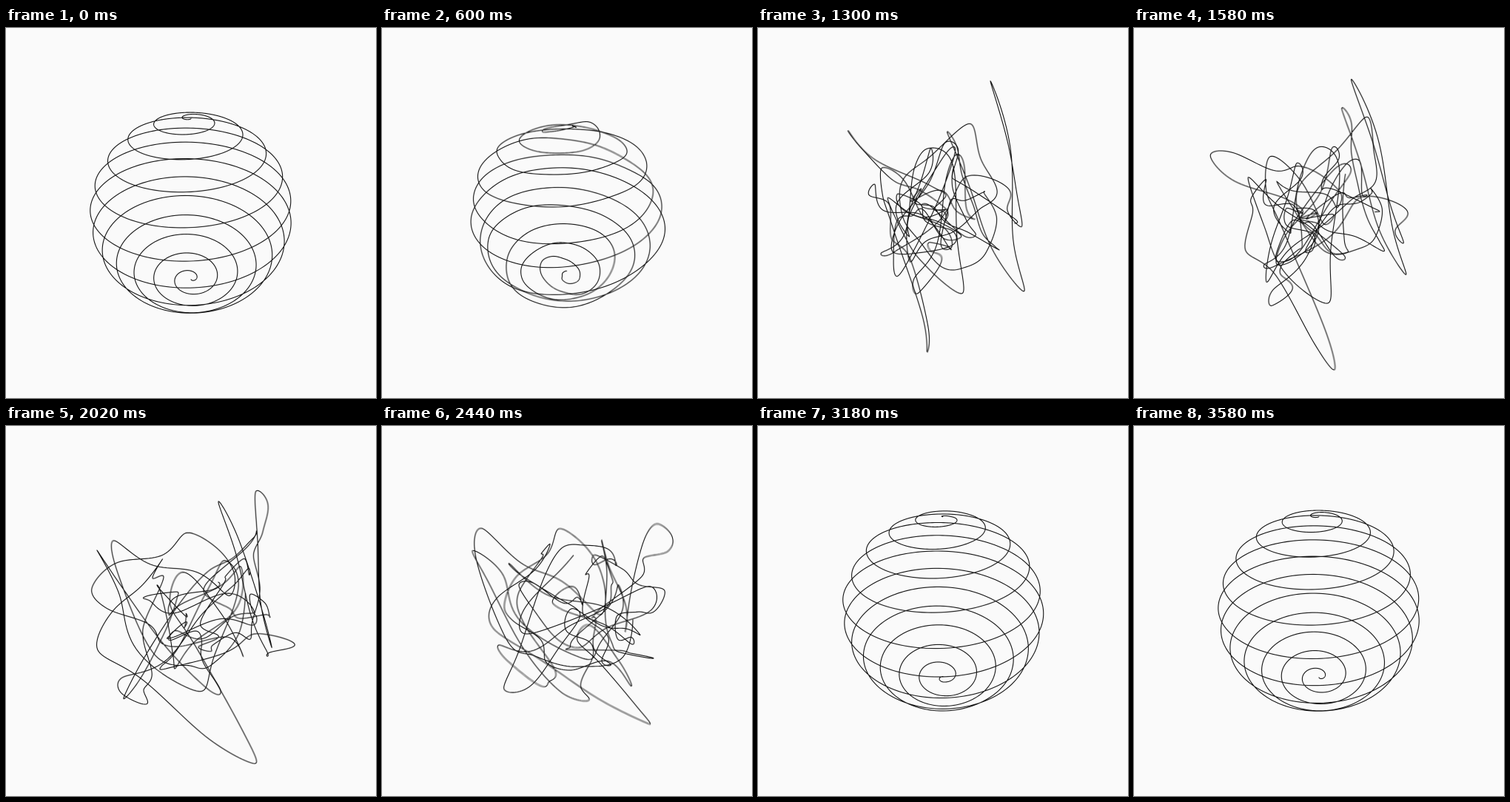
Recreate the animation shown at these times as an HTML page with a canvas. Size 500 by 500 pixels, loop 3600 ms.

```html
<!DOCTYPE html>
<html lang="en">
<head>
<meta charset="utf-8">
<title>Tangling spiral sphere</title>
<style>
  html, body { margin: 0; width: 100%; height: 100%; overflow: hidden; background: #fafafa; }
  canvas { display: block; }
</style>
</head>
<body>
<canvas id="stage" width="500" height="500"></canvas>
<script>
const SIZE = 500, LOOP = 3600, TAU = 2 * Math.PI;
const RADIUS = 130, TURNS = 12, SPINS = 3, TILT = Math.PI / 5;
const CAMERA = SIZE / 2 / Math.tan(Math.PI / 6);
const POINTS = 2200;
const SAMPLES = 5, SHUTTER = 0.7 * 20 / LOOP;

const ctx = document.getElementById('stage').getContext('2d');
const layer = document.createElement('canvas');
layer.width = layer.height = SIZE;
const pen = layer.getContext('2d');

let seed = 4711;
function random() {
  seed = (seed * 1664525 + 1013904223) % 4294967296;
  return seed / 4294967296;
}
const bell = () => random() + random() + random() - 1.5;

// Each knot swings once per loop: [centre, reach, phase] for x, y and z.
const makeKnots = (count, spread) => Array.from({ length: count }, () =>
  Array.from({ length: 3 }, () => [spread * bell(), spread * 0.6, TAU * random()]));

// Wide wandering plus small wiggles; one long spike sweeps below the tangle.
const wander = makeKnots(52, 98), wiggle = makeKnots(150, 15);
wander[41] = [[21, 89, -1.86], [135, 95, 3], [0, 0, 0]];

function spline(knots, t) {
  const at = knots.map(knot => knot.map(([m, r, phase]) => m + r * Math.cos(TAU * t - phase)));
  return (p, axis) => {
    const u = p * (knots.length - 3), i = Math.min(Math.floor(u), knots.length - 4), f = u - i;
    const [a, b, c, d] = at.slice(i, i + 4).map(point => point[axis]);
    return b + 0.5 * f * (c - a + f * (2 * a - 5 * b + 4 * c - d + f * (3 * (b - c) + d - a)));
  };
}

function sphere(p, t) {
  const theta = Math.PI * p, phi = TAU * (TURNS * p - SPINS * t);
  const ring = RADIUS * Math.sin(theta), up = RADIUS * Math.cos(theta);
  const front = ring * Math.cos(phi);
  return [
    -ring * Math.sin(phi),
    front * Math.sin(TILT) - up * Math.cos(TILT),
    front * Math.cos(TILT) + up * Math.sin(TILT)
  ];
}

const ease = s => s < 0.5 ? 4 * s ** 3 : 1 - 4 * (1 - s) ** 3;

function drawCurve(t) {
  const mix = ease((1 - Math.cos(TAU * t)) / 2);
  const coarse = spline(wander, t), fine = spline(wiggle, t);
  pen.fillStyle = '#fafafa';
  pen.fillRect(0, 0, SIZE, SIZE);
  pen.beginPath();
  for (let i = 0; i <= POINTS; i++) {
    const p = i / POINTS;
    const [x, y, z] = sphere(p, t).map((v, axis) =>
      v + (coarse(p, axis) + fine(p, axis) - v) * mix);
    const scale = CAMERA / (CAMERA - z);
    pen.lineTo(SIZE / 2 + x * scale, SIZE / 2 + y * scale);
  }
  pen.strokeStyle = '#141414';
  pen.lineWidth = 1.1;
  pen.lineJoin = 'round';
  pen.stroke();
}

// Motion blur: the running average of a few moments.
function draw() {
  const t = performance.now() % LOOP / LOOP;
  for (let i = 0; i < SAMPLES; i++) {
    drawCurve(t + SHUTTER * i / SAMPLES);
    ctx.globalAlpha = 1 / (i + 1);
    ctx.drawImage(layer, 0, 0);
  }
  requestAnimationFrame(draw);
}
draw();
</script>
</body>
</html>
```
